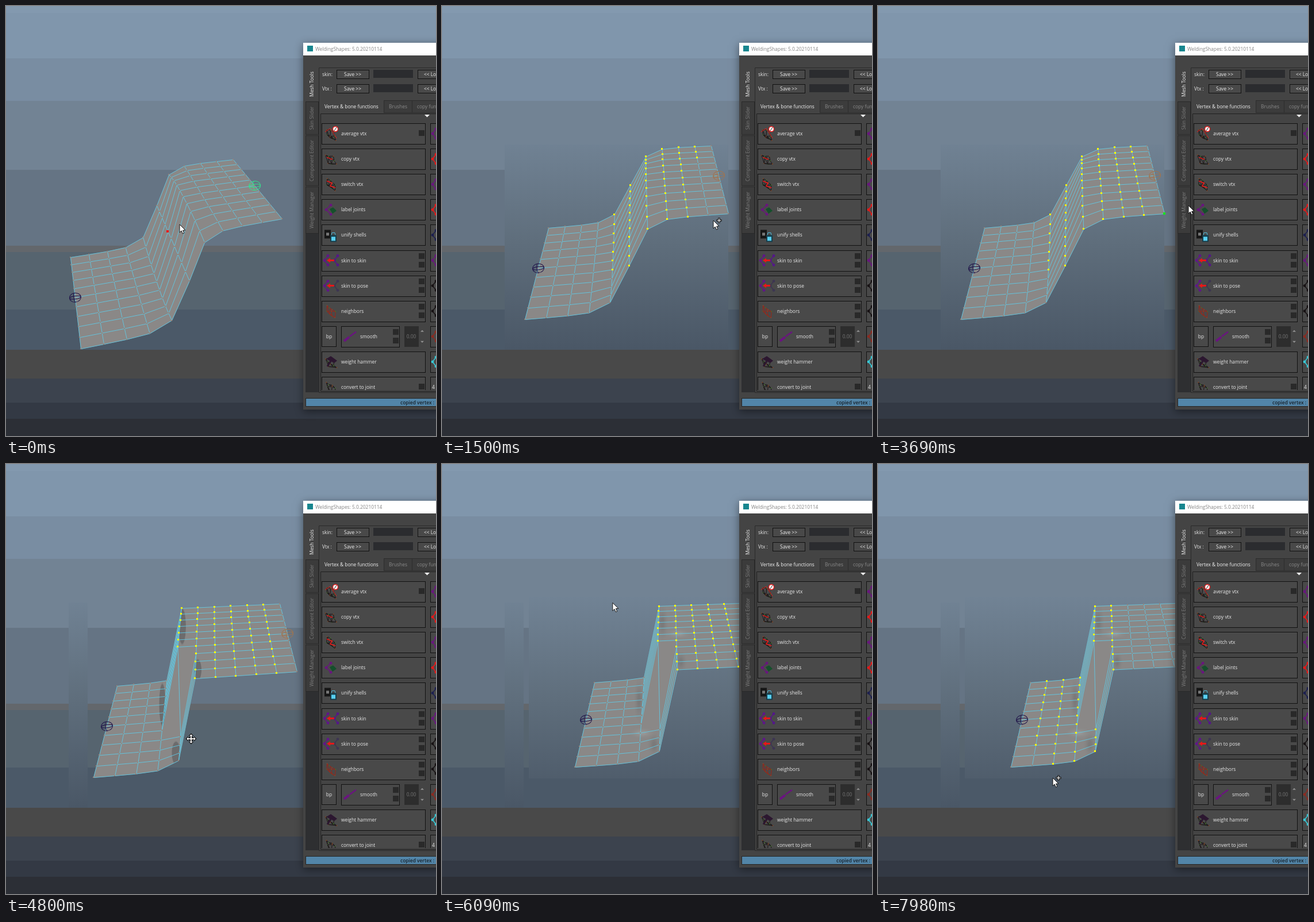
An HTML page with a canvas for the animation above (8 s loop, 748x748 px).

```html
<!DOCTYPE html>
<html lang="en">
<head>
<meta charset="utf-8">
<title>Mesh editing</title>
<style>
html, body { margin: 0; width: 100%; height: 100%; overflow: hidden; background: #2c2f36; }
canvas { display: block; width: 748px; height: 748px; }
</style>
</head>
<body>
<canvas id="stage" width="748" height="748"></canvas>
<script>
const ctx = document.getElementById('stage').getContext('2d');
const LOOP = 8000, N = 10;
const FONT = '"Open Sans", "Noto Sans", sans-serif';
const TURN = 270, FOLD = 4380, PAN = 4800, SWING = 5190, SETTLE = 5580;

const clamp = k => Math.max(0, Math.min(1, k));
const ease = k => k * k * (3 - 2 * k);
const mix = (a, b, k) => a + (b - a) * k;
const mixPt = (a, b, k) => [mix(a[0], b[0], k), mix(a[1], b[1], k)];

// ---------- pointer path: time, x, y ----------
const stops = [
  [0, 302, 380], [270, 322, 366], [660, 287, 211], [1110, 444.5, 467], [1230, 444.5, 467],
  [1500, 472, 373], [2040, 454, 314], [2310, 440, 267], [3180, 470, 367], [3300, 486, 365],
  [3690, 540, 347], [3960, 613, 236], [4380, 617, 257], [4800, 322, 478], [5190, 349, 416],
  [5700, 352, 425], [6210, 288, 212], [6330, 288, 212], [6810, 411, 553], [7170, 336, 411],
  [7560, 259, 502], [7980, 304, 546]];

function pointerAt(t) {
  const i = Math.max(1, stops.findIndex(s => s[0] >= t));
  const [t0, ...a] = stops[i - 1], [t1, ...b] = stops[i];
  return mixPt(a, b, ease(clamp((t - t0) / (t1 - t0))));
}

// ---------- mesh: two parallel planes blended by skin weights ----------
// corners of each plane: back left, back right, front left, front right
const tilted = {
  low: [[112, 437], [432, 387], [130, 596], [530, 516]],
  high: [[109, 297], [395, 267], [135, 430], [480, 370]]
};
const turned = {
  low: [[185, 386], [473, 361], [144, 545], [516, 515]],
  high: [[183, 256], [468, 243], [143, 385], [498, 361]]
};
const swung = {
  low: [[255, 374], [545, 352], [231, 530], [601, 497]],
  high: [[252, 244], [537, 232], [228, 369], [585, 345]]
};
const settled = {
  low: [[265, 380], [552, 358], [231, 527], [599, 502]],
  high: [[264, 251], [547, 241], [232, 366], [586, 349]]
};

// rows bunch up towards the back
const depth = v => .78 * v / (1 - .22 * v);

function onPlane([a, b, c, d], col, row) {
  return mixPt(mixPt(a, b, col / N), mixPt(c, d, col / N), depth(row / N));
}

// closest-distance weight between a joint on either side
function weight(c, r) {
  return 1 / (1 + (Math.hypot(N - c, r - 5) / Math.hypot(c, r - 5)) ** 10.5);
}

function makeGrid(pose, raised) {
  return Array.from({ length: N + 1 }, (_, c) => Array.from({ length: N + 1 }, (_, r) => {
    const w = raised && raised.has(c * 100 + r) ? 1 : weight(c, r);
    return mixPt(onPlane(pose.low, c, r), onPlane(pose.high, c, r), w);
  }));
}

const mixGrid = (a, b, k) => a.map((col, c) => col.map((p, r) => mixPt(p, b[c][r], k)));

function inside(grid, box) {
  const [p, q] = [pointerAt(box.from), pointerAt(box.to)];
  const within = (v, i) => v >= Math.min(p[i], q[i]) && v <= Math.max(p[i], q[i]);
  const found = new Set();
  grid.forEach((col, c) => col.forEach(([x, y], r) => {
    if (within(x, 0) && within(y, 1)) found.add(c * 100 + r);
  }));
  return found;
}

const boxes = [{ from: 660, to: 1230 }, { from: 2310, to: 3180, add: true },
  { from: 6330, to: 6810 }, { from: 7170, to: 7560, add: true }];
const grids = { tilted: makeGrid(tilted), turned: makeGrid(turned) };

let chosen = new Set();
boxes.forEach((box, i) => {
  if (i === 2) for (const [name, pose] of Object.entries({ folded: turned, swung, settled }))
    grids[name] = makeGrid(pose, chosen);
  const found = inside(i < 2 ? grids.turned : grids.settled, box);
  chosen = box.picked = new Set(box.add ? [...chosen, ...found] : found);
});

const pickedAt = t => (boxes.filter(b => t >= b.to + 120).pop() || { picked: new Set() }).picked;

function gridAt(t) {
  if (t < FOLD) return t < TURN ? grids.tilted : grids.turned;
  if (t < PAN) return grids.folded;
  const moved = grids.folded.map(col => col.map(([x, y]) => [x + 8, y]));
  if (t < SWING) return mixGrid(moved, grids.swung, ease((t - PAN) / (SWING - PAN)));
  return mixGrid(grids.swung, grids.settled, ease(clamp((t - SWING) / (SETTLE - SWING))));
}

// ---------- drawing helpers ----------
function rect(x, y, w, h, fill) {
  ctx.fillStyle = fill;
  ctx.fillRect(x, y, w, h);
}

function path(pts, stroke, width = 1, fill) {
  ctx.beginPath();
  pts.forEach(([x, y], i) => i ? ctx.lineTo(x, y) : ctx.moveTo(x, y));
  if (fill) { ctx.closePath(); ctx.fillStyle = fill; ctx.fill(); }
  if (stroke) { ctx.strokeStyle = stroke; ctx.lineWidth = width; ctx.stroke(); }
}

function dot(x, y, r, fill) {
  ctx.beginPath();
  ctx.arc(x, y, r, 0, 7);
  ctx.fillStyle = fill;
  ctx.fill();
}

function text(s, x, y, color = '#e8e8e8', align = 'left', bold = 400) {
  ctx.font = `${bold} 8.4px ${FONT}`;
  ctx.textAlign = align;
  ctx.fillStyle = color;
  ctx.fillText(s, x, y);
}

// ---------- backdrop ----------
const bands = [[0, '#8399af'], [12, '#8096ac'], [91, '#798da2'], [165, '#728394'], [285, '#657484'],
  [417, '#63676c'], [428, '#56646f'], [528, '#4b5968'], [598, '#494949'], [648, '#3c434e'],
  [690, '#333944'], [718, '#2c2f36']];

function drawBands(x, top, w, bottom) {
  bands.forEach(([y, color], i) => {
    const a = Math.max(top, y), b = Math.min(bottom, i + 1 < bands.length ? bands[i + 1][0] : 748);
    if (b > a) rect(x, a, w, b - a, color);
  });
}

function drawSmooth(x, y, w, h) {
  const g = ctx.createLinearGradient(0, 220, 0, 598);
  g.addColorStop(0, '#728496');
  g.addColorStop(.5, '#5f6e7c');
  g.addColorStop(1, '#4a5766');
  rect(x, y, w, h, g);
}

function drawBackdrop(t) {
  drawBands(0, 0, 748, 748);
  if (t >= TURN) drawSmooth(109, 241, 389, 357);
  if (t >= FOLD) {
    const x = t < PAN ? 255 : 142;
    drawBands(x, 63, 517 - x, 712);
  }
  if (t >= PAN + 150) drawSmooth(151, 231, 366, 316);
}

// ---------- mesh drawing ----------
function blob([x, y], rx, ry, color, soft) {
  ctx.save();
  ctx.translate(x, y);
  ctx.scale(rx, ry);
  const g = ctx.createRadialGradient(0, 0, 0, 0, 0, 1);
  g.addColorStop(soft ? .2 : .85, color);
  g.addColorStop(1, 'rgba(128,128,128,0)');
  dot(0, 0, 1, g);
  ctx.restore();
}

function shadeFold(g, t) {
  const soft = t >= PAN + 150, dark = soft ? 'rgba(108,108,109,.5)' : 'rgba(92,92,94,.65)';
  const k = soft ? 1.6 : 1;
  const near = (c, r, dx) => [g[c][r][0] + dx * k, g[c][r][1]];
  blob(near(4, 3, 4), 7 * k, 34, dark, soft);
  blob(near(5, 9, 4), 7 * k, 20, dark, soft);
  blob(near(3, 3, -4), 6 * k, 40, dark, soft);
  blob(near(4, 9, -6), 8 * k, 22, dark, soft);
  if (soft) for (const p of [near(5, 5, 2), near(3, 7, 2)]) blob(p, 28, 12, 'rgba(165,165,164,.45)', true);
}

function drawJoint([x, y], color) {
  ctx.save();
  ctx.translate(x, y);
  ctx.rotate(-.12);
  ctx.strokeStyle = color;
  ctx.lineWidth = 1;
  for (const [rx, ry] of [[10, 8], [10, 2.6], [2.6, 8]]) {
    ctx.beginPath();
    ctx.ellipse(0, 0, rx, ry, 0, rx < ry ? 1.6 : 0, rx < ry ? 4.7 : 6.3);
    ctx.stroke();
  }
  ctx.restore();
}

function drawMesh(t) {
  const g = gridAt(t), picked = pickedAt(t), shape = new Path2D();
  ctx.save();
  ctx.beginPath();
  ctx.rect(0, 0, 517, 748);
  ctx.clip();
  ctx.translate(.5, .5);

  for (let c = 0; c < N; c++) for (let r = 0; r < N; r++) {
    const quad = [g[c][r], g[c + 1][r], g[c + 1][r + 1], g[c][r + 1]];
    path(quad, '#8a8887', 1, '#8a8887');
    quad.forEach(([x, y], i) => i ? shape.lineTo(x, y) : shape.moveTo(x, y));
    shape.closePath();
  }
  if (t >= FOLD) {
    ctx.save();
    ctx.clip(shape);
    shadeFold(g, t);
    ctx.restore();
  }

  for (let i = 0; i <= N; i++) {
    path(g[i], '#5fcdea', .85);
    path(g.map(col => col[i]), '#5fcdea', .85);
  }
  drawJoint(g[0][5], '#21154a');
  drawJoint(g[10][5], t < TURN ? '#35e08c' : '#a1754f');

  const mark = ([x, y], size, color) =>
    rect(Math.round(x - size / 2) - .5, Math.round(y - size / 2) - .5, size, size, color);
  g.forEach((col, c) => col.forEach((p, r) => {
    if (picked.has(c * 100 + r)) mark(p, 3, '#ffff00');
    else mark(p, 2, '#97857b');
  }));
  if (t < 420) mark(g[5][4], 4, '#f01414');
  if (t >= 3300 && t < FOLD) mark(g[10][10], 4, '#19e619');
  ctx.restore();
}

// ---------- tool window ----------
const PURPLE = '#6a1480', RED = '#e81818', INK = '#171214';

function button(x, y, w, h) {
  rect(x, y, w, h, '#494949');
  ctx.strokeStyle = '#111';
  ctx.lineWidth = 1;
  ctx.strokeRect(x + .5, y + .5, w - 1, h - 1);
}

// small tilted lattice, lightly jittered
function lattice(y, color, seed) {
  const at = (i, j) => {
    const n = Math.sin(seed * 9 + i * 5 + j * 3) * 1.8;
    return [557 + i * 6 + j * 2.5 + n, y - 8 + j * 7 + i * 1.8 - n];
  };
  for (let i = 0; i < 3; i++) {
    path([0, 1, 2].map(j => at(i, j)), color);
    path([0, 1, 2].map(j => at(j, i)), color);
    path([at(0, i), at(i, 2)], color, .8);
    for (let j = 0; j < 3; j++) dot(...at(i, j), .9, (i + j) % 2 ? '#3f7a25' : '#8d4a26');
  }
}

function bones(x, y, dx, color) {
  const pts = [-1, 0, 1].map(k => [x + Math.abs(k) * dx, y + k * 8]);
  path(pts, color, 1.6);
  pts.forEach(p => dot(...p, 2.4, color));
}

function transfer(y, end) {
  bones(554, y, 6, '#5f168a');
  bones(571, y, 6, end);
  path([[558, y], [564, y - 4], [564, y - 1.5], [571, y - 1.5], [571, y + 1.5], [564, y + 1.5], [564, y + 4]],
    null, 1, RED);
}

// label, check boxes, icon, colour of the neighbouring icon
const rows = [
  ['average vtx', 1, y => {
    lattice(y + 2, INK, 1);
    path([[555, y - 3], [564, y - 9], [575, y + 8]], RED);
    dot(573, y - 8, 5.2, RED);
    dot(573, y - 8, 3.8, '#fff');
    path([[571, y - 5], [575, y - 11]], '#222');
  }, PURPLE],
  ['copy vtx', 0, y => {
    lattice(y, INK, 2);
    path([[558, y - 3], [568, y + 1]], RED, 1.5);
  }, RED],
  ['switch vtx', 0, y => {
    lattice(y, INK, 3);
    path([[558, y - 6], [567, y - 2], [564, y + 3], [573, y + 6]], RED, 1.6);
  }, PURPLE],
  ['label joints', 0, y => {
    bones(557, y, 8, PURPLE);
    path([[563, y - 1], [569, y - 4], [575, y + 2], [568, y + 7]], null, 1, '#14502b');
  }, RED],
  ['unify shells', 0, y => {
    rect(554, y - 9, 11, 15, '#161616');
    rect(557, y - 4, 5, 5, '#777');
    rect(564, y, 11, 12, '#163e4b');
    rect(566, y + 3, 7, 7, '#58d0f2');
    path([[566, y], [567, y - 4], [572, y - 4], [573, y]], '#4ebee0');
  }, '#1d2050'],
  ['skin to skin', 2, y => transfer(y, '#54178a'), PURPLE],
  ['skin to pose', 2, y => transfer(y, '#3d3552'), INK],
  ['neighbors', 2, y => lattice(y, '#9c2419', 5), INK],
  ['smooth', 0, y => {
    path([[588, y + 8], [597, y + 1]], PURPLE, 4);
    path([[598, y], [609, y - 8]], PURPLE, 2.5);
  }, '#8d2a20'],
  ['weight hammer', 0, y => {
    lattice(y + 2, INK, 6);
    path([[557, y - 5], [565, y - 10], [576, y - 2], [571, y + 2]], null, 1, '#2c1730');
    path([[566, y - 3], [559, y + 8]], '#2c1730', 3);
  }, '#37c7d4'],
  ['convert to joint', 1, y => lattice(y, INK, 7), INK]
];

function drawRow([label, checks, icon, tint], i) {
  const y = 222 + i * 44.1, top = Math.round(y - 18), small = label === 'smooth';
  if (small) {
    button(549, top, 26, 36);
    text('bp', 562, y + 3, '#e8e8e8', 'center');
    rect(693, top, 25, 36, '#2d2d2d');
    text('0.00', 705, y + 3, '#777', 'center');
    for (const s of [-1, 1])
      path([[721, y + s * 8], [727, y + s * 8], [724, y + s * 11]], null, 1, '#939393');
  }
  button(small ? 583 : 549, top, small ? 102 : 181, 37);
  text(label, small ? 616 : 583, y + 3);
  for (let k = 0; k < (small ? 2 : checks); k++)
    rect(small ? 673 : 718, top + (checks === 1 ? 12 : 5 + k * 15), 10, 10, '#292929');
  icon(y);

  button(738, top, 40, 37);
  if (i === rows.length - 1) text('4', 741, y + 3);
  else bones(742, y, 6, tint);
}

function sideTab(label, y, h, active) {
  if (!active) {
    rect(521, y, 23, h, '#292929');
    rect(522, y + 1, 21, h - 2, '#3b3b3b');
  }
  ctx.save();
  ctx.translate(535, y + h / 2);
  ctx.rotate(-Math.PI / 2);
  text(label, 0, 0, active ? '#f2f2f2' : '#7d7d7d', 'center');
  ctx.restore();
}

function drawWindow() {
  ctx.save();
  ctx.shadowColor = 'rgba(0,0,0,.45)';
  ctx.shadowBlur = 14;
  ctx.shadowOffsetY = 3;
  rect(517, 64, 260, 638, '#444444');
  ctx.restore();
  rect(517, 64, 231, 22, '#ffffff');
  rect(524, 69, 10, 10, '#17868f');
  text('WeldingShapes: 5.0.20210114', 538, 78, '#858585');

  rect(521, 396, 23, 276, '#2e2f31');
  sideTab('Mesh Tools', 107, 58, true);
  sideTab('Skin Slider', 166, 58);
  sideTab('Component Editor', 225, 88);
  sideTab('Weight Manager', 314, 82);
  path([[748, 107.5], [544.5, 107.5], [544.5, 672.5], [748, 672.5]], '#2a2a2a');

  ['skin:', 'Vtx :'].forEach((label, i) => {
    const y = 111 + i * 25;
    text(label, 550, y + 11);
    button(575, y, 57, 16);
    text('Save >>', 603, y + 11, '#eee', 'center');
    rect(639, y, 69, 14, '#2b2c2f');
    button(716, y, 70, 16);
    text('<< Load', 727, y + 11, '#eee');
  });

  rect(657, 164, 91, 22, '#2c2c2c');
  rect(658, 165, 48, 20, '#3c3c3c');
  rect(707, 165, 41, 20, '#3c3c3c');
  text('Vertex & bone functions', 554, 178, '#f2f2f2');
  text('Brushes', 682, 178, '#8a8a8a', 'center');
  text('copy functions', 715, 178, '#8a8a8a');
  path([[748, 187.5], [547.5, 187.5], [547.5, 670.5], [748, 670.5]], '#202020');
  path([[728, 189], [737, 189], [732.5, 193.5]], null, 1, '#f4f4f4');

  ctx.save();
  ctx.beginPath();
  ctx.rect(547, 188, 201, 480);
  ctx.clip();
  rows.forEach(drawRow);
  ctx.restore();

  rect(521, 682, 227, 15, '#262626');
  rect(522, 683, 226, 13, '#5285a8');
  text('copied vertex : 1', 686, 692.5, '#17212a', 'left', 600);
}

// ---------- pointer drawing ----------
function drawPointer(t) {
  const [x, y] = pointerAt(t);
  const box = boxes.find(b => t > b.from && t <= b.to);
  if (box) {
    const [x0, y0] = pointerAt(box.from);
    ctx.setLineDash([2, 2]);
    ctx.strokeStyle = '#d5d9dd';
    ctx.lineWidth = 1;
    ctx.strokeRect(Math.round(x0) + .5, Math.round(y0) + .5, Math.round(x - x0), Math.round(y - y0));
    ctx.setLineDash([]);
  }

  ctx.save();
  ctx.translate(x, y);
  if (t >= PAN && t < SWING) {
    for (const [color, width, tip] of [['#111', 4.5, 4.5], ['#fff', 1.8, 2.8]])
      for (let i = 0; i < 4; i++) {
        path([[0, 0], [0, -6]], color, width);
        path([[-tip, -5], [0, -5 - tip], [tip, -5]], null, 1, color);
        ctx.rotate(Math.PI / 2);
      }
  } else {
    path([[0, 0], [0, 14], [3.2, 11], [5.4, 16], [7.8, 15], [5.6, 10.2], [10, 10], [0, 0]], '#111', 1, '#fff');
    if ((t >= 660 && t < 3450) || t >= 6210)
      for (const [color, w, r] of [['#111', 3.4, 4.6], ['#fff', 1.2, 3.4]]) {
        path([[10 - r, 0], [10 + r, 0]], color, w);
        path([[10, -r], [10, r]], color, w);
      }
  }
  ctx.restore();
}

function frame(now) {
  const t = Math.min(now % LOOP, stops[stops.length - 1][0]);
  drawBackdrop(t);
  drawMesh(t);
  drawWindow();
  drawPointer(t);
  requestAnimationFrame(frame);
}
requestAnimationFrame(frame);
</script>
</body>
</html>
```
